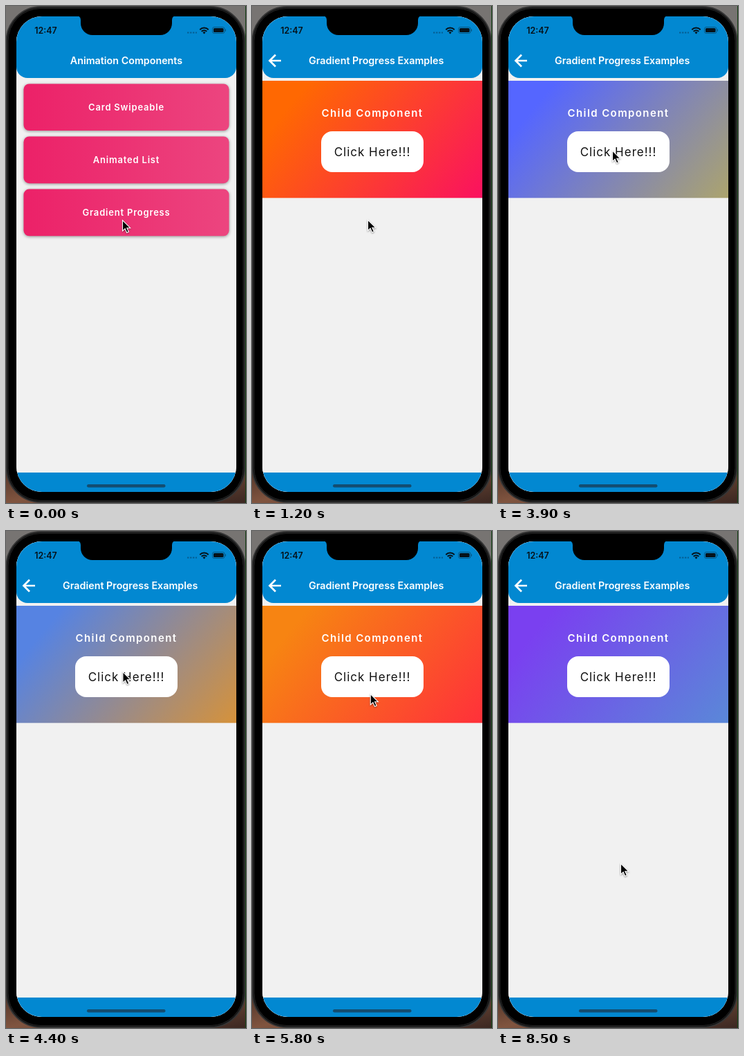
These frames come from a looping animation (347x718 px, 8600 ms). An HTML page:

```html
<!DOCTYPE html>
<html lang="en">
<head>
<meta charset="utf-8">
<title>Gradient progress</title>
<style>
  html, body { margin: 0; width: 100%; height: 100%; overflow: hidden; background: #000; }
  svg { display: block; width: 347px; height: 718px; }
  text { font-family: Inter, sans-serif; text-anchor: middle; fill: #fff; font-weight: 600; }
  .title { font-size: 14.3px; }
  .label { font-size: 13px; letter-spacing: .8px; }
  .card { filter: drop-shadow(0 1.5px 2px #0006); }
</style>
</head>
<body>
<svg viewBox="0 0 347 718">
  <defs>
    <clipPath id="screen"><rect x="15" y="15" width="318" height="687" rx="37"/></clipPath>
    <linearGradient id="pink"><stop stop-color="#ec2168"/><stop offset="1" stop-color="#ec457f"/></linearGradient>
    <linearGradient id="cycle" gradientUnits="userSpaceOnUse" x1="15" y1="108" x2="287" y2="334">
      <stop id="from" offset=".15"/><stop id="to" offset="1"/>
    </linearGradient>
    <linearGradient id="wood" x2="1" y2="1"><stop stop-color="#33211b"/><stop offset=".5" stop-color="#80543f"/><stop offset="1" stop-color="#3b2721"/></linearGradient>
    <path id="header" d="M15 15H333V88a16 16 0 0 1-16 16H31a16 16 0 0 1-16-16Z" fill="#0288d1"/>
  </defs>

  <!-- Desktop and phone body -->
  <rect width="347" height="718" fill="#777472"/>
  <rect y="640" width="347" height="78" fill="url(#wood)"/>
  <rect x=".5" y="1" width="345" height="716" rx="50" fill="#111" stroke="#353535" stroke-width="2"/>
  <rect x="3" y="3.5" width="340" height="711" rx="47" fill="#000" stroke="#242424"/>
  <path d="M346.5 0V718" stroke="#123f12"/>

  <g clip-path="url(#screen)">
    <rect x="15" y="15" width="318" height="687" fill="#f1f1f1"/>
    <g id="menu">
      <rect x="15" y="15" width="318" height="687" fill="#f1f1f1"/>
      <use href="#header"/>
      <text class="title" x="174" y="84">Animation Components</text>
      <g id="cards"></g>
    </g>
    <g id="example">
      <rect x="15" y="15" width="318" height="687" fill="#f1f1f1"/>
      <use href="#header"/>
      <path d="M42 79H26M34 70.5L25.5 79L34 87.5" fill="none" stroke="#fff" stroke-width="2.7"/>
      <text class="title" x="179.7" y="84">Gradient Progress Examples</text>
      <rect x="15" y="108" width="318" height="169.3" fill="url(#cycle)"/>
      <text x="174" y="160" font-size="15" letter-spacing="1.4">Child Component</text>
      <rect x="100" y="181" width="148" height="59" rx="16" fill="#fff"/>
      <text x="174" y="216.5" font-size="17" letter-spacing="1" style="fill:#111;font-weight:400">Click Here!!!</text>
    </g>
    <rect x="15" y="674" width="318" height="28" fill="#0288d1"/>
    <rect x="117" y="691" width="113.500" height="4.500" rx="2.200" fill="#134d70"/>

    <!-- Status bar -->
    <path d="M103 14Q108 15 108 20V25a17 17 0 0 0 17 17H223a17 17 0 0 0 17-17V20Q240 15 245 14Z"/>
    <text x="57.500" y="39.500" font-size="12.500" style="fill:#06121a">12:47</text>
    <path d="M262 38.500H276" stroke="#055f93" stroke-width="2" stroke-dasharray="2.500 1.500"/>
    <g fill="none" stroke="#06121a" stroke-width="2">
      <path d="M280.300 34.200a8.700 8.700 0 0 1 12.400 0M282.700 36.700a5.400 5.400 0 0 1 7.600 0"/>
    </g>
    <path d="M284.500 38.300a2.900 2.900 0 0 1 4 0L286.500 40.500Z" fill="#06121a"/>
    <rect x="298.500" y="30.500" width="17.500" height="9" rx="2.600" fill="none" stroke="#075783"/>
    <rect x="300" y="32" width="14.500" height="6" rx="1.500" fill="#06121a"/>
    <path d="M317.500 33.500V36.500" stroke="#075783"/>
  </g>

  <path id="cursor" d="M0 0V15.500L3.600 12.200L6.200 18L8.900 16.800L6.300 11.200H11.200Z" stroke="#fff" stroke-width="1.100" style="filter:drop-shadow(0 1px 1px #0006)"/>
</svg>

<script>
const LOOP = 8600, CYCLE = 5000, LEAD = 1000;
const byId = id => document.getElementById(id);

byId('cards').innerHTML = ['Card Swipeable', 'Animated List', 'Gradient Progress'].map((label, i) => {
  const y = 112.4 + i * 76.1;
  return `<g class="card" id="card${i}"><rect x="25.500" y="${y}" width="297" height="67.700" rx="8" fill="url(#pink)"/>
    <text class="label" x="174" y="${y + 38.6}">${label}</text></g>`;
}).join('');

// Each key is [time, ...values]
const palette = [
  [-100, 172, 164, 109], [900, 255, 128, 8], [1200, 255, 104, 2], [2150, 255, 16, 90],
  [3100, 158, 43, 207], [3500, 122, 64, 240], [3900, 85, 102, 255],
  [4100, 74, 114, 255], [4500, 90, 136, 216], [4900, 172, 164, 109], [5900, 255, 128, 8]
];
const pointer = [
  [0, 168.5, 309.5], [1000, 167.5, 309], [3300, 167.5, 309], [3800, 165.5, 209],
  [4100, 165.5, 209], [4800, 173.500, 196.500], [5600, 173.500, 196.500],
  [6500, 163.5, 371.5], [7300, 163.5, 371.5], [8300, 177.5, 480.5], [LOOP, 177.5, 480.5]
];

function sample(keys, time) {
  const next = Math.max(1, keys.findIndex(key => key[0] >= time));
  const a = keys[next - 1], b = keys[next];
  const k = (time - a[0]) / (b[0] - a[0]);
  return a.slice(1).map((value, i) => value + (b[i + 1] - value) * k);
}

const colorAt = time => `rgb(${sample(palette, time % CYCLE).map(Math.round)})`;
const clamp = x => Math.min(1, Math.max(0, x));

function draw(time) {
  const push = 1 - (1 - clamp((time - 350) / 480)) ** 3;
  byId('menu').setAttribute('transform', `translate(${-95 * push})`);
  byId('example').setAttribute('transform', `translate(${318 * (1 - push)})`);
  byId('card2').setAttribute('opacity', 1 - 0.6 * clamp((time - 120) / 150));
  byId('from').setAttribute('stop-color', colorAt(time));
  byId('to').setAttribute('stop-color', colorAt(time + LEAD));
  byId('cursor').setAttribute('transform', `translate(${sample(pointer, time)})`);
}

function tick() {
  draw(performance.now() % LOOP);
  requestAnimationFrame(tick);
}
tick();
</script>
</body>
</html>
```
